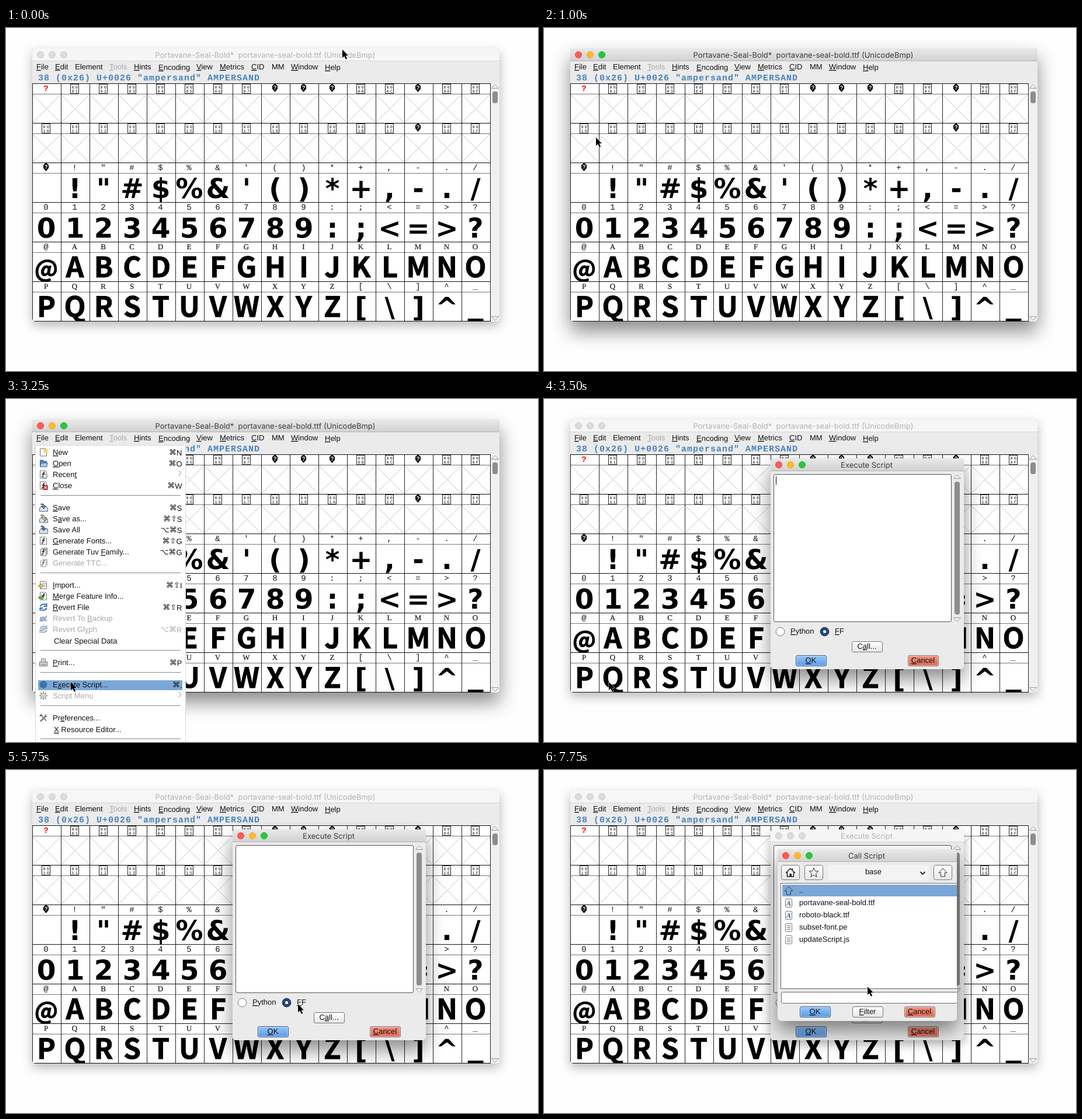
Animation, 911 px wide and 589 px high, one loop 8000 ms. Source, as an HTML page:

```html
<!DOCTYPE html>
<html lang="en">
<head>
<meta charset="utf-8">
<title>Execute Script</title>
<style>
html, body { margin: 0; width: 100%; height: 100%; overflow: hidden; background: #fefefe; }
svg { display: block; width: 911px; height: 589px; }
text { font: 13px "Liberation Sans", Arial, sans-serif; white-space: pre; fill: #111; text-rendering: geometricPrecision; }
text.title { font: 13px Inter, sans-serif; fill: #3c3c3c; text-anchor: middle; }
text.info { font: bold 15px "Liberation Mono", monospace; letter-spacing: 1px; fill: #4a82bf; }
text.mid { text-anchor: middle; }
text.key { font-family: "Liberation Sans", "DejaVu Sans", sans-serif; text-anchor: end; }
text.dim { fill: #a9a9a9; }
text.label { font: 14px "Liberation Mono", monospace; text-anchor: middle; }
text.cap { font: 13px "Liberation Serif", serif; text-anchor: middle; stroke: #111; stroke-width: .2; }
text.hex { font: 7px "Liberation Mono", monospace; letter-spacing: 2px; }
text.num { font: bold 47px "DejaVu Sans", sans-serif; text-anchor: middle; fill: #000; }
text.big { font: bold 48px "Noto Sans CJK JP", "Noto Sans CJK", sans-serif; text-anchor: middle; fill: #000; stroke: #000; stroke-width: .9; }
text.at { font-size: 40px; }
.u { text-decoration: underline; }
.frame { fill: #ebebeb; filter: drop-shadow(0 0 .6px rgba(0,0,0,.5)) drop-shadow(0 17px 16px rgba(0,0,0,.45)); }
.off .frame { filter: drop-shadow(0 0 .6px rgba(0,0,0,.4)) drop-shadow(0 7px 9px rgba(0,0,0,.28)); }
.off .bar { fill: #f6f6f6; }
.off .rule { stroke: #d6d6d6; }
.off .light { fill: #dcdcdc; stroke: #cbcbcb; }
.off .title { fill: #b2b2b2; }
</style>
</head>
<body>
<svg id="stage" viewBox="0 0 911 589">
  <defs>
    <linearGradient id="bar" x2="0" y2="1"><stop stop-color="#e9e9e9"/><stop offset="1" stop-color="#d1d1d1"/></linearGradient>
    <linearGradient id="plain" x2="0" y2="1"><stop stop-color="#fff"/><stop offset="1" stop-color="#e6e6e6"/></linearGradient>
    <linearGradient id="ok" x2="0" y2="1"><stop stop-color="#9ac6f6"/><stop offset="1" stop-color="#559ae9"/></linearGradient>
    <linearGradient id="cancel" x2="0" y2="1"><stop stop-color="#f09382"/><stop offset="1" stop-color="#e4664f"/></linearGradient>
  </defs>
</svg>
<script>
const stage = document.getElementById('stage');
const BLUE = '#7ba7d7';

function el(parent, tag, attrs = {}) {
  const node = document.createElementNS('http://www.w3.org/2000/svg', tag);
  for (const k in attrs) node.setAttribute(k, attrs[k]);
  return parent.appendChild(node);
}
const group = (p, attrs) => el(p, 'g', attrs);
const rect = (p, x, y, width, height, fill, more) => el(p, 'rect', { x, y, width, height, fill, ...more });
const path = (p, d, fill, stroke = 'none', more) => el(p, 'path', { d, fill, stroke, ...more });
const line = (p, d, stroke) => path(p, d, 'none', stroke);
const circle = (p, cx, cy, r, fill, stroke = 'none') => el(p, 'circle', { cx, cy, r, fill, stroke });

// "_" marks the underlined letter that follows it
function text(p, x, y, str, cls = '') {
  const node = el(p, 'text', { x, y, class: cls });
  str.split(/_(.)/).forEach((part, i) => {
    if (part) el(node, 'tspan', i % 2 ? { class: 'u' } : {}).textContent = part;
  });
  return node;
}

function makeWindow(id, x, y, w, h, title) {
  const g = group(stage);
  el(g, 'rect', { class: 'frame', x, y, width: w, height: h, rx: 5 });
  const clip = el(g, 'clipPath', { id });
  rect(clip, x, y, w, h, '#000', { rx: 5 });
  const body = group(g, { 'clip-path': `url(#${id})` });
  rect(body, x, y, w, 22, 'url(#bar)', { class: 'bar' });
  path(body, `M${x} ${y + 21.5}h${w}`, 'none', '#b4b4b4', { class: 'rule' });
  [['#fc5b56', '#ee524c'], ['#fdb92f', '#eeac28'], ['#2ac63f', '#24b838']].forEach(([fill, stroke], i) =>
    el(body, 'circle', { class: 'light', cx: x + 14 + 20 * i, cy: y + 11, r: 5.6, fill, stroke }));
  text(body, x + w / 2 - 1, y + 15.5, title, 'title');
  return { g, body };
}

function scrollbar(p, cx, top, bottom, y, h) {
  path(p, `M${cx} ${top - 4}l6 6.5h-12z`, '#f4f4f4', '#999');
  path(p, `M${cx} ${bottom + 4}l6-6.5h-12z`, '#f4f4f4', '#999');
  rect(p, cx - 4.5, y, 9, h, '#8d8d8d', { rx: 3.5 });
}

function button(p, x, y, label, kind = 'plain') {
  const g = group(p);
  rect(g, x + .5, y + .5, 52, 18, `url(#${kind})`, { rx: 2.5, stroke: kind === 'ok' ? '#33588a' : '#777' });
  if (kind !== 'plain') rect(g, x + 1.5, y + 1.5, 50, 16, 'none', { rx: 2, stroke: '#fff', 'stroke-opacity': .55 });
  text(g, x + 26, y + 13, label, 'mid');
  return g;
}

/* Font window */
const main = makeWindow('clipMain', 45, 35, 800, 469, 'Portavane-Seal-Bold*  portavane-seal-bold.ttf (UnicodeBmp)');
const mb = main.body;
[[52, '_File'], [84, '_Edit'], [118, 'Element'], [177, '_Tools', 'dim'], [219, '_Hints'], [261, '_Encoding'], [326, '_View'],
 [366, '_Metrics'], [420, '_CID'], [455, 'MM'], [488, '_Window'], [546, '_Help']]
  .forEach(([x, s, cls]) => text(mb, x, x === 261 || x === 546 ? 72 : 71, s, cls));
text(mb, 55, 90, '38 (0x26) U+0026 "ampersand" AMPERSAND', 'info');
rect(mb, 45, 95, 785, 409, '#fff');

const DIAMONDS = [8, 9, 10, 13, 29, 32];
function cell(code) {
  const c = code % 16, r = code >> 4;
  const x = 45 + 49 * c, y = 95 + 68 * r, cx = x + 23.5, ch = String.fromCharCode(code);
  if (r < 2) line(mb, `M${x} ${y + 19}l49 49m0-49l-49 49`, '#c6c6c6');
  if (!code) {
    text(mb, cx, y + 13, '?', 'label').style.cssText = 'fill:#f00;font-weight:bold';
  } else if (DIAMONDS.includes(code)) {
    path(mb, `M${cx} ${y}q2 2 4.500 4.500v5l-4.500 5.500-4.500-5.500v-5q2.500-2.500 4.500-4.500z`, '#000');
    text(mb, cx, y + 11, '?', 'mid').style.cssText = 'fill:#fff;font-size:10px;font-weight:bold';
  } else if (r < 2) {
    rect(mb, cx - 7, y + 1.5, 14, 16, '#fff', { stroke: '#222' });
    text(mb, cx - 5, y + 8.5, '00', 'hex');
    text(mb, cx - 5, y + 16, code.toString(16).toUpperCase().padStart(2, '0'), 'hex');
  } else {
    text(mb, cx, y + 13, ch, /[A-Z]/.test(ch) ? 'cap' : 'label');
    text(mb, cx + .5, y + 61, ch, ch === '@' ? 'big at' : /[A-Z_]/.test(ch) ? 'big' : 'num');
  }
}
for (let code = 0; code < 96; code++) cell(code);
for (let r = 0; r < 7; r++) {
  line(mb, `M45 ${95.5 + 68 * r}h785`, '#111');
  if (r < 6) line(mb, `M45 ${113.5 + 68 * r}h785`, '#777');
}
for (let c = 0; c < 17; c++) line(mb, `M${45.5 + 49 * c} 95v409`, '#222');
rect(mb, 830, 95, 15, 409, '#f0f0f0');
scrollbar(mb, 837.5, 101, 498, 109, 20);

/* File menu */
const page = ['M1.5 .5h9l2 2v11h-11z', '#f7f7f7', '#777'];
const stack = ['M4.5 .5h9v11M2.5 2.5h9v11h-9z', '#f7f7f7', '#666'];
const eff = ['M9.5 3.5C7.5 2.5 7 4 6.7 7S6 12 4 11M4.8 6.3h4.4', 'none', '#222', 1.4];
const drive = ['M.5 8.5l3-4h8l3 4v5h-14z', '#dbe4ee', '#566'];
const drop = color => ['M2 1c5-1.5 7 .5 7 4h2.5l-4 4-4-4H6C6 3 5 2 2 1z', color, '#456'];
const spin = color => ['M2 6a5.5 5 0 0 1 9-3M12.5 .5v5h-5M12.5 8a5.5 5 0 0 1-9 3M1.5 13.5v-5h5', 'none', color, 2];
const disc = (fill, stroke, r = 3.5, x = 10, y = 10) =>
  [`M${x - r} ${y}a${r} ${r} 0 1 0 ${2 * r} 0a${r} ${r} 0 1 0 ${-2 * r} 0z`, fill, stroke];
const ICONS = {
  fresh: [page, ['M11 0l1.2 2.3 2.8.5-2 2 .5 2.8-2.5-1.3-2.5 1.3.5-2.8-2-2 2.8-.5z', '#f7df4a', '#e0c020', .6]],
  open: [['M1.5 1.5h5l1 2h5v9h-11z', '#5e89bd', '#34567f'], ['M3 6.500h11.500l-2 6.500h-11z', '#a9c7ea', '#456c9c']],
  recent: [page, eff, disc('#eef4fb', '#4a6d96')],
  close: [page, eff, ['M7 7h7v7h-7z', '#d3202c', '#a01018'], ['M8.500 8.500l4 4m0-4l-4 4', 'none', '#fff', 1.3]],
  save: [drive, drop('#5b92cf')],
  saveAs: [drive, drop('#f1d04b'), ['M8 12l5-5', 'none', '#444', 1.5]],
  saveAll: [['M2.500 5.500h12v5', 'none', '#789'], drive, drop('#4a7eb9')],
  font: [page, eff],
  fonts: [stack, eff],
  load: [page, ['M5 4h6M5 6.500h6M5 9h6', 'none', '#999'], ['M-1 7h4v-2.500l4 4-4 4v-2.500h-4z', '#e6d25a', '#776a20', .7]],
  merge: [page, eff, ['M-1 8h5v-2.500l4 4-4 4v-2.500h-5z', '#62b83f', '#2f6b1c', .7]],
  revert: [spin('#3267ad')],
  backup: [['M1 12.500l1-8 2 2 3-3 1 3 5-4-2.500 6 3 3-5-.5z', '#5c7fae', '#4a6b96']],
  glyph: [spin('#4d6b90'), disc('#9aa9bb', '#607080', 2.5, 7, 7)],
  print: [['M3.500 6v-5.500h7v5.500', '#fff', '#777'], ['M.5 6h13v7h-13z', '#d9d9d9', '#666'], ['M3 10h8M5 3h4', 'none', '#666']],
  script: [disc('#3b74a8', 'none', 6.5, 7, 7)],
  gear: [['M7 0v14M0 7h14M2 2l10 10M12 2l-10 10', 'none', '#555', 2], disc('#ccc', '#555', 4.5, 7, 7), disc('#fff', '#555', 1.8, 7, 7)],
  tools: [['M2 13l9-9', 'none', '#456f9f', 2.4], ['M3 2l9 10', 'none', '#888', 2.2], ['M10 1l.5 3 3 .5', 'none', '#777', 1.7], ['M1 4l3-3', 'none', '#555', 2]],
};
function icon(p, name, x, y, faded) {
  const g = group(p, { transform: `translate(${x} ${y})`, opacity: faded ? .6 : 1 });
  ICONS[name].forEach(([d, fill, stroke, w = 1]) => path(g, d, fill, stroke, { 'stroke-width': w }));
}

const menu = group(stage);
rect(menu, 50.5, 79.5, 257, 520, '#fff', { stroke: '#d9d9d9' });
const hilite = rect(menu, 55, 0, 247, 17, BLUE);
const rows = [];
const SEP = null;
[['fresh', '_New', '⌘N'], ['open', '_Open', '⌘O'], ['recent', 'Recen_t', '>'], ['close', '_Close', '⌘W'], SEP,
 ['save', '_Save', '⌘S'], ['saveAs', 'S_ave as...', '⌘⇧S'], ['saveAll', 'Save All', '⌥⌘S'], ['font', '_Generate Fonts...', '⌘⇧G'],
 ['fonts', 'Generate Tuv _Family...', '⌥⌘G'], ['fonts', 'Generate TTC...', '', 1], SEP,
 ['load', '_Import...', '⌘⇧I'], ['merge', '_Merge Feature Info...', ''], ['revert', '_Revert File', '⌘⇧R'],
 ['backup', 'Revert To _Backup', '', 1], ['glyph', 'Revert Gl_yph', '⌥⌘R', 1], ['', 'Clear Special Data', ''], SEP,
 ['print', '_Print...', '⌘P'], SEP, ['script', 'E_xecute Script...', '⌘.'], ['gear', 'Script Menu', '>', 1], SEP,
 ['tools', 'Pr_eferences...', ''], ['', '_X Resource Editor...', ''], SEP].forEach((item, i) => {
  const y = 91 + 19 * i;
  if (!item) return line(menu, `M59 ${y - 1.5}h240`, '#888');
  const [pic, label, key, off] = item, cls = off ? 'dim' : '';
  if (pic) icon(menu, pic, 57, y - 6.5, off);
  text(menu, pic ? 80 : 82, y + (pic ? 5 : 6), label, cls);
  if (key === '>') line(menu, `M295.500 ${y - 6}l4.500 4.500-4.500 4.500`, '#888');
  else if (key) {
    const node = text(menu, 301.5, y + 5, key.slice(0, -1), 'key ' + cls);
    el(node, 'tspan', { dy: 1 }).textContent = key.slice(-1);
  }
  if (!off) rows.push(y);
});

/* Execute Script dialog */
const exec = makeWindow('clipExec', 388, 102, 331, 362, 'Execute Script');
const eb = exec.body;
rect(eb, 393.5, 129.5, 304, 253, '#fff', { rx: 2.5, stroke: '#555' });
const caret = rect(eb, 397, 133, 1, 14, '#000');
scrollbar(eb, 707.5, 134, 378, 142, 228);
function radio(cx, label, x) {
  circle(eb, cx, 399.5, 7.3, '#fff', '#777');
  const on = group(eb);
  circle(on, cx, 399.5, 7.3, '#26467a', '#16305a');
  circle(on, cx, 399.5, 2.5, '#fff');
  text(eb, x, 403, label);
  return on;
}
const pyOn = radio(404.5, '_Python', 422);
const ffOn = radio(480.5, '_FF', 498);
const call = button(eb, 527, 416, 'C_all...');
button(eb, 431, 440, '_OK', 'ok');
button(eb, 623, 440, '_Cancel', 'cancel');

/* Call Script dialog */
const pick = makeWindow('clipPick', 400, 136, 307, 295, 'Call Script');
const pb = pick.body;
[406, 446, 667].forEach(x => rect(pb, x + .5, 163.5, 31, 25, 'url(#plain)', { rx: 3, stroke: '#777' }));
path(pb, 'M414 177l8-8 8 8M416.500 175v8h11v-8M425.500 169v3', 'none', '#222', { 'stroke-width': 1.5 });
rect(pb, 420.5, 178, 3.5, 5, '#222');
path(pb, 'M462 168l2.300 5.500 5.700.4-4.400 3.800 1.400 5.800-5-3.200-5 3.200 1.400-5.800-4.400-3.800 5.700-.4z', 'none', '#333');
const UP = 'l7 7.500h-3.500v6.500h-7v-6.500h-3.500z';
path(pb, 'M683 169' + UP, 'none', '#333');
rect(pb, 486, 163, 173, 26, '#f3f3f3', { rx: 3 });
text(pb, 564, 179, 'base', 'mid');
path(pb, 'M644.500 175l4 4 4-4', 'none', '#222', { 'stroke-width': 1.8 });
rect(pb, 405.5, 194.5, 310, 181, '#fff', { stroke: '#666' });
rect(pb, 408, 197, 300, 20, BLUE);
path(pb, 'M419 200' + UP, 'none', '#345');
text(pb, 437, 211, '..');
['portavane-seal-bold.ttf', 'roboto-black.ttf', 'subset-font.pe', 'updateScript.js'].forEach((name, i) => {
  const y = 228 + 21 * i;
  rect(pb, 413.5, y - 6.5, 11, 14, '#fff', { rx: 1, stroke: '#777' });
  if (i < 2) text(pb, 419, y + 5, 'A', 'mid').style.cssText = 'font:italic bold 12px "Liberation Serif",serif;fill:#2c5a96';
  else line(pb, `M416 ${y - 2.5}h6m-6 3h6m-6 3h6`, '#666');
  text(pb, 437, y + 4, name);
});
rect(pb, 406.5, 381.5, 310, 19, '#fff', { rx: 2, stroke: '#666' });
button(pb, 438, 406, '_OK', 'ok');
button(pb, 528, 406, '_Filter');
button(pb, 617, 406, '_Cancel', 'cancel');

const pointer = path(stage, 'M0 0V14L3.300 11.200 5.800 16.800 8.100 15.700 5.700 10.300H10z', '#000', '#fff',
  { 'stroke-width': 1, 'paint-order': 'stroke' });

const LOOP = 8000, TICK = 250;
const MOVES = [ // ms, x, y
  [0, 576, 37], [500, 470, 70], [750, 230, 150], [1000, 89, 188], [1250, 54, 67], [1750, 53, 69],
  [2000, 59, 88], [2250, 80, 202], [2500, 98, 336], [2750, 107, 443], [3000, 111, 482], [3250, 111, 486],
  [4000, 138, 476], [4250, 230, 445], [4500, 330, 417], [4750, 388, 404], [5000, 403, 399],
  [5500, 455, 402], [5750, 500, 402], [6500, 520, 411], [6750, 546, 423], [7000, 551, 425],
  [7250, 532, 360], [7500, 480, 237], [7750, 554, 372],
];
const show = (node, on) => { node.style.display = on ? '' : 'none'; };
const start = performance.now();
let shown = -1;

function draw() {
  const t = Math.floor((performance.now() - start) % LOOP / TICK) * TICK;
  requestAnimationFrame(draw);
  if (t === shown) return;
  shown = t;
  const within = (a, b = LOOP) => t >= a && t < b;
  const [, x, y] = MOVES.filter(m => m[0] <= t).pop();
  pointer.setAttribute('transform', `translate(${x} ${y})`);

  main.g.classList.toggle('off', !within(250, 3500));
  exec.g.classList.toggle('off', within(7250));
  show(menu, within(1500, 3500));
  show(exec.g, within(3500));
  show(pick.g, within(7250));

  const row = rows.find(r => Math.abs(r - y) < 9.5);
  show(hilite, row);
  if (row) hilite.setAttribute('y', row - 7);

  const python = within(5250, 5750);
  show(caret, within(3500, 4000) || within(4500, 5000));
  show(pyOn, python);
  show(ffOn, !python);
  call.setAttribute('opacity', python ? .4 : 1);
}
draw();
</script>
</body>
</html>
```
